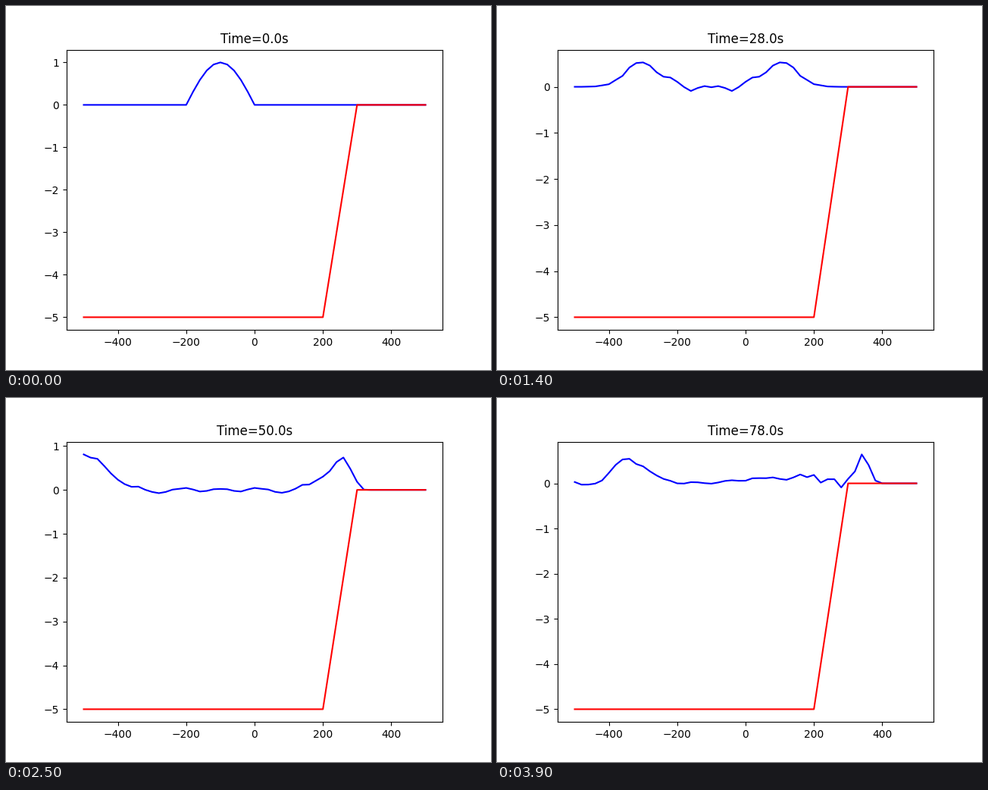
A matplotlib script for the animation above (4 s loop, 640 by 480 pixels).

```python
import numpy as np
import matplotlib.pyplot as plt
from matplotlib.animation import FuncAnimation

G = 9.81
DX = 20.0
FRAMES = 40
FRAME_TIME = 2.0
STEPS = 20
DT = FRAME_TIME / STEPS

x = np.arange(-500, 501, DX)
bed = np.interp(x, [200, 300], [-5, 0])


def slope(f):
    return np.gradient(f, DX)


def rates(state):
    eta, u = state
    du = -u * slope(u) - G * slope(eta)
    du[[0, -1]] = 0
    return np.array([-slope((eta - bed) * u), du])


def rk4(s):
    k1 = rates(s)
    k2 = rates(s + DT / 2 * k1)
    k3 = rates(s + DT / 2 * k2)
    k4 = rates(s + DT * k3)
    return s + DT / 6 * (k1 + 2 * k2 + 2 * k3 + k4)


def simulate():
    hump = np.where((x >= -200) & (x <= 0), np.sin(-np.pi * x / 200), 0)
    state = np.array([hump, np.zeros_like(x)])
    levels = []
    for _ in range(FRAMES):
        levels.append(state[0].copy())
        for _ in range(STEPS):
            state = rk4(state)
    return levels


levels = simulate()
fig, ax = plt.subplots(figsize=(6.4, 4.8), dpi=100)


def draw(i):
    ax.clear()
    ax.plot(x, levels[i], "b")
    ax.plot(x, bed, "r")
    ax.set_title(f"Time={i * FRAME_TIME:.1f}s")


anim = FuncAnimation(fig, draw, frames=FRAMES, interval=100, repeat=True,
                     init_func=lambda: None)
plt.show()
```
